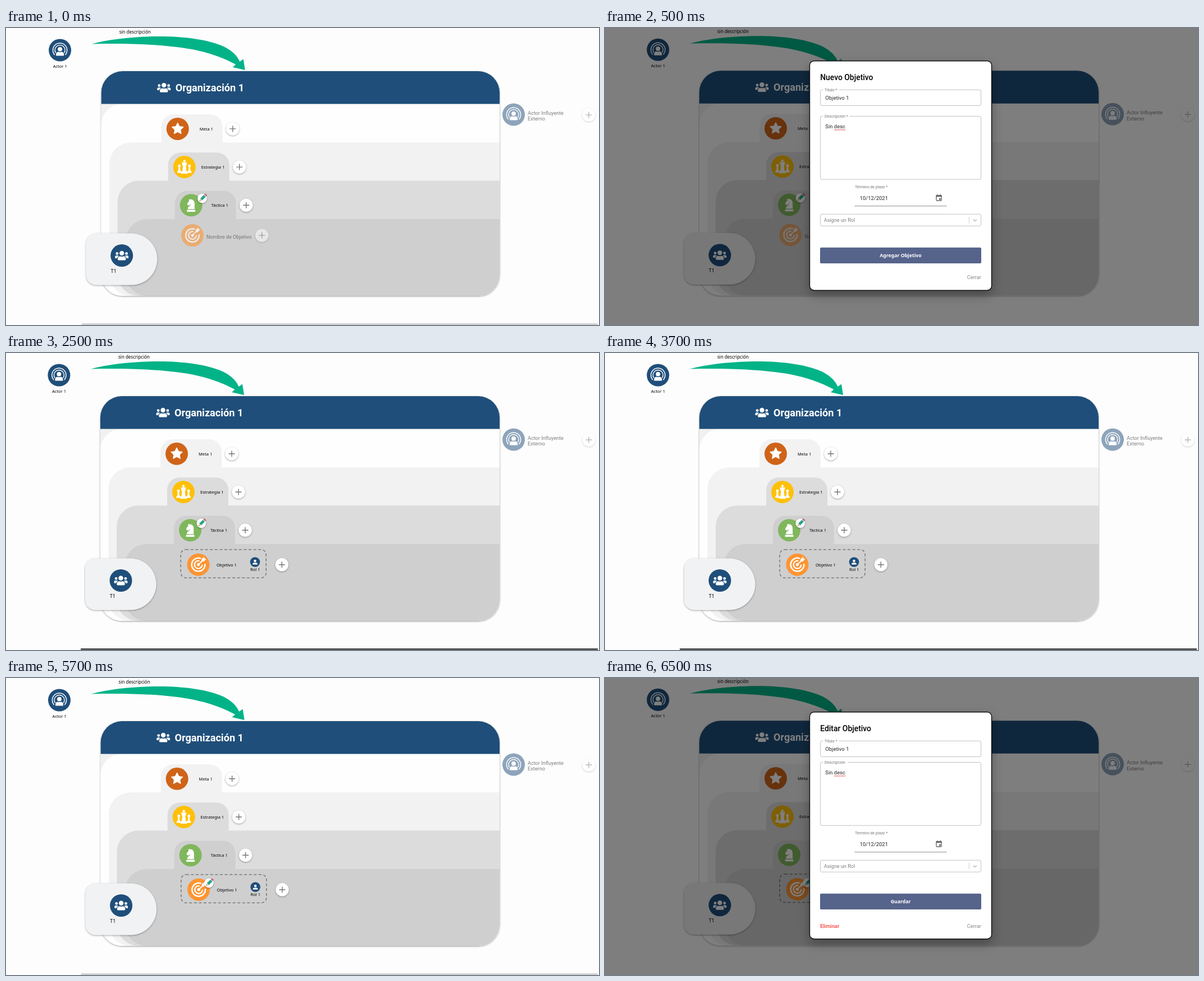
An HTML page that plays this animation: 1056x530 px, repeating every 8000 ms.

```html
<!DOCTYPE html>
<html lang="es">
<head>
<meta charset="utf-8">
<style>
html, body { margin: 0; width: 100%; height: 100%; overflow: hidden; background: #fdfdfd; }
svg { display: block; width: 1056px; height: 530px; }
text { font-family: Roboto, sans-serif; }
.small { font: 7.5px "Noto Sans", sans-serif; }
.button { font: bold 8.7px "Noto Sans", sans-serif; fill: #fff; }
.field { font-size: 9.3px; letter-spacing: .08px; fill: #222; }
.label { font-size: 7px; fill: #757575; }
.box { fill: #fff; stroke: #c2c2c2; }
</style>
</head>
<body>
<svg viewBox="0 0 1056 530">
  <defs>
    <filter id="soft" x="-30%" y="-30%" width="160%" height="160%">
      <feDropShadow dx="0" dy="1" stdDeviation="1.5" flood-opacity=".4"/>
    </filter>
    <filter id="deep" x="-30%" y="-30%" width="160%" height="160%">
      <feDropShadow dx="0" dy="8" stdDeviation="10" flood-opacity=".3"/>
    </filter>
  </defs>
  <g id="stage"></g>
</svg>
<script>
const BLUE = '#1f4e7a';
const LOOP = 8000;
const STATES = [
  { at: 0, dx: 1.7, dy: 0.1, bar: '#d0d0d0', pencil: [347.7, 304] },
  { at: 500, dx: 0, dy: -0.7, pencil: [347.7, 304], dialog: 'new' },
  { at: 2500, dx: 0, dy: 0, bar: '#555', pencil: [347.7, 304], saved: true },
  { at: 4500, dx: 0.6, dy: 0, bar: '#d0d0d0', pencil: [360.7, 366], saved: true },
  { at: 6500, dx: 0, dy: -0.7, pencil: [360.7, 366], saved: true, dialog: 'edit' }
];

const group = (x, y, body, extra = '') => `<g transform="translate(${x} ${y})" ${extra}>${body}</g>`;
const text = (x, y, str, attrs = 'class="small"') => `<text x="${x}" y="${y}" ${attrs}>${str}</text>`;
const rect = (x, y, w, h, attrs) => `<rect x="${x}" y="${y}" width="${w}" height="${h}" ${attrs}/>`;
const line = (d, color, width = 1) => `<path d="${d}" fill="none" stroke="${color}" stroke-width="${width}"/>`;
const disc = (r, fill, attrs = '') => `<circle r="${r}" fill="${fill}" ${attrs}/>`;
const badge = (x, y, fill, icon, extra) => group(x, y, disc(20, fill) + icon, extra);
const plus = (x, y, extra) => group(x, y,
  disc(11.6, '#fff', 'filter="url(#soft)"') + line('M-5.5 0H5.5M0 -5.5V5.5', '#757575', 1.4), extra);

// Box with separate corner radii: top left, top right, bottom right, bottom left
function shape(x, y, right, bottom, [a, b, c, d], attrs) {
  return `<path d="M${x + a} ${y}H${right - b}A${b} ${b} 0 0 1 ${right} ${y + b}V${bottom - c}` +
    `A${c} ${c} 0 0 1 ${right - c} ${bottom}H${x + d}A${d} ${d} 0 0 1 ${x} ${bottom - d}` +
    `V${y + a}A${a} ${a} 0 0 1 ${x + a} ${y}Z" ${attrs}/>`;
}

function arc(r, from, to) {
  const at = deg => `${r * Math.cos(deg * Math.PI / 180)} ${r * Math.sin(deg * Math.PI / 180)}`;
  return `M${at(from)}A${r} ${r} 0 ${to - from > 180 ? 1 : 0} 1 ${at(to)}`;
}

const starPoints = Array.from({ length: 10 }, (_, i) => {
  const r = i % 2 ? 5.2 : 10.4, a = i * Math.PI / 5;
  return `${r * Math.sin(a)},${-r * Math.cos(a)}`;
}).join(' ');

const PAWN = `<path d="M-1.2 -3.4H1.2L1.8 3.5 3.8 6V8H-3.8V6L-1.8 3.5Z"/><circle cy="-4.6" r="2.5"/>`;
const ICONS = {
  star: `<polygon points="${starPoints}" fill="#fff" stroke="#fff" stroke-width="1.4" stroke-linejoin="round"/>`,
  team: `<g fill="#fff"><circle cy="-4.2" r="4.2"/><circle cx="-8.4" cy="-3.6" r="2.4"/><circle cx="8.4" cy="-3.6" r="2.4"/>
    <path d="M-3 1.2Q0 2.4 3 1.2Q7.2 1.5 7.2 5.8V7Q7.2 8.4 5.6 8.4H-5.6Q-7.2 8.4 -7.2 7V5.8Q-7.2 1.5 -3 1.2Z"/>
    <path id="side" d="M-5.5 .7Q-7.9 2 -8.4 4.8H-11Q-12 4.8 -12 3.6V2.4Q-12 0 -9.6 0H-7.2Q-6.2 0 -5.5 .7Z"/>
    <path transform="scale(-1 1)" d="M-5.5 .7Q-7.9 2 -8.4 4.8H-11Q-12 4.8 -12 3.6V2.4Q-12 0 -9.6 0H-7.2Q-6.2 0 -5.5 .7Z"/></g>`.replace(' id="side"', ''),
  actor: line(arc(12.6, 138, 402), '#fff', 1.5) + line(arc(9, 146, 394), '#fff', 1.4) +
    `<g fill="#fff"><circle cy="-1.8" r="3.9"/><path d="M-7 10V8Q-7 3.2 -2.8 3Q0 4.2 2.8 3Q7 3.2 7 8V10Z"/></g>`,
  chess: `<g fill="#fff">${group(-9, 2.5, PAWN)}${group(9, 2.5, PAWN)}
    <path d="M-1 -13H1V-11.3H2.6V-9.5H1V-8H4.8L3.2 -2H2.6L3.4 6.5 5.8 9V12H-5.8V9L-3.4 6.5 -2.6 -2H-3.2L-4.8 -8H-1V-9.5H-2.6V-11.3H-1Z"/></g>`,
  knight: `<path fill="#fff" d="M-5.8 7V5.6C-5.8 2 -.4 1.6 -.4 -2L-3.6 .8 -7 -1 -6.8 -3.4 -3.4 -8 -4 -10.6H-.5C5 -10.6 6.6 -5.5 6.2 0V7ZM-7.4 8.2H7.4V11.8H-7.4Z"/>`,
  target: line(arc(11.8, -8, 292), '#fff', 2.5) + line(arc(6.9, 0, 285), '#fff', 2.3) + disc(2.6, '#fff') +
    line('M0 0L8 -8', '#fff', 2) + `<path fill="#fff" d="M5.2 -6.4L6 -10.2 10.4 -14 11 -11 14 -10.4 10.2 -6 6.4 -5.2Z"/>`,
  user: `<g fill="#fff"><circle cy="-2" r="2.3"/><path d="M-4.3 4.4V3Q-4 .9 0 .9T4.3 3V4.4Z"/></g>`
};

const pencil = (x, y) => group(x, y, disc(8.2, '#fff', 'filter="url(#soft)"') +
  `<g transform="rotate(45)">${rect(-2.4, -6.5, 4.8, 9, 'fill="#22a58a"')}${rect(-2.4, -10.2, 4.8, 2.6, 'rx="1" fill="#d9535b"')}
   ${rect(-2.4, -7.8, 4.8, 1.5, 'fill="#c9d0d3"')}<path d="M-2.4 2.5H2.4L0 6.8Z" fill="#e8c9a0"/><path d="M-.9 5.2H.9L0 6.8Z" fill="#444"/></g>`);

function panel(left) {
  const edge = 879, bottom = 478, r = 38;
  const layer = (dx, y, fill) => shape(left + dx, y, edge, bottom, [r, 0, r, r], `fill="${fill}"`);
  return shape(left, 77, edge, bottom, [r, r, r, r], 'fill="#f1f1f1" filter="url(#soft)"') +
    layer(0, 135, '#fefefe') + layer(14.5, 204.3, '#f2f2f2') +
    layer(29, 272.3, '#dcdcdc') + layer(43.5, 341, '#cfcfcf') +
    shape(left, 77, edge, 135.5, [r, r, 0, 0], `fill="${BLUE}"`);
}

function row(i, fill, tabFill, icon, name) {
  const x = 275 + 12 * i, y = 154 + 68.2 * i;
  return shape(x, y, x + 109, y + 51, [22, 22, 0, 0], `fill="${tabFill}"`) +
    badge(x + 29, y + 25.8, fill, icon) +
    text([343, 346, 364][i], y + 28.5, name) + plus(x + 127, y + 25.8);
}

function goal(saved) {
  if (!saved) return badge(330.3, 370, '#fd9533', ICONS.target, 'opacity=".6"') +
    text(355.2, 375.5, 'Nombre de Objetivo', 'font-size="9.15" fill="#757575"') + plus(454, 370, 'opacity=".5"');
  return rect(311.2, 350.7, 152, 50.5, 'rx="9" fill="none" stroke="#7b7b7b" stroke-width="1.6" stroke-dasharray="5 3.6"') +
    badge(342.5, 377.7, '#fd9533', ICONS.target) + text(375, 380.5, 'Objetivo 1') +
    group(443.5, 373, disc(8.8, BLUE) + ICONS.user) + text(435, 389, 'Rol 1') + plus(491.3, 377.7);
}

function scene({ dx, dy, saved, pencil: at, bar }) {
  const main = badge(94.4, 39.5, BLUE, ICONS.actor) + text(82, 71, 'Actor 1') +
    text(200, 9.6, 'sin descripción', 'class="small" style="font-size:8px"') +
    `<path fill="#03b388" d="M151 28.4C185 19 235 14.3 280 15C325 16 358 22 380 30.5C400 38.5 410 49 414.5 60L421 55.5 424 75 402 70 407.5 65C385 53 360 44 330 38C280 29 220 27 151 28.4Z"/>` +
    group(279.5, 106.2, ICONS.team) +
    text(300, 112.6, 'Organización 1', 'font-size="18.1" font-weight="700" fill="#fff"') +
    row(0, '#cf6418', '#f2f2f2', ICONS.star, 'Meta 1') +
    row(1, '#ffc007', '#dcdcdc', ICONS.chess, 'Estrategia 1') +
    row(2, '#80b75c', '#cfcfcf', ICONS.knight, 'Táctica 1') +
    goal(saved) + pencil(...at) +
    shape(141, 366.5, 267.5, 458.5, [18, 46, 46, 18], 'fill="#f1f2f3" filter="url(#soft)"') +
    badge(204.5, 406, BLUE, ICONS.team) + text(184.7, 437, 'T1', 'class="small" style="font-size:9px"');
  const outside = badge(904, 154.5, BLUE, ICONS.actor) +
    text(929, 154.8, 'Actor Influyente', 'font-size="9.15"') + text(929, 165.4, 'Externo', 'font-size="9.15"') + plus(1037.8, 155);
  return rect(0, 0, 1056, 530, 'fill="#fdfdfd"') + group(0, dy, panel(168 + dx)) + group(dx, dy, main) +
    group(0, dy, outside, 'opacity=".5"') +
    (bar ? rect(133 + dx, 527, 921 - dx, 3, `rx="1" fill="${bar}"`) : '');
}

const outlined = (y, h, label, gap) => rect(383.5, y, 286, h, 'rx="2.5" class="box"') +
  rect(388, y - 1, gap, 2, 'fill="#fff"') + text(391, y + 2.4, label, 'class="label"');

function dialog(kind) {
  const edit = kind === 'edit';
  const top = edit ? 60.7 : 58.7, height = edit ? 405 : 409.5;
  const shift = edit ? -7 : 0, head = edit ? 2 : 0;
  const area = edit ? 150.5 : 157.5, close = edit ? 445.6 : 448;
  const squiggle = `M408 ${area + 23.6}` + 'l1.25 1.4l1.25 -1.4'.repeat(8);
  const form = text(445, 286.4, 'Término de plazo *', 'class="label"') +
    text(453.7, 307.2, '10/12/2021', 'class="field"') + line('M444.5 317.7H608.5', '#8c8c8c') +
    rect(590, 298.8, 9.2, 9.2, 'rx="1" fill="none" stroke="#666" stroke-width="1.3"') +
    rect(589.6, 298.2, 10, 3, 'fill="#666"') + line('M592 296.8V299M597.2 296.8V299', '#666', 1.3) +
    rect(595, 303.7, 2.9, 2.9, 'fill="#666"') +
    rect(383.5, 332.2, 286, 21, 'rx="2.5" class="box"') +
    text(389.7, 346.3, 'Asigne un Rol', 'font-size="9.15" fill="#808080"') +
    line('M648.3 337V348.5', '#ccc') + line('M655.8 341.5L658.8 344.5 661.8 341.5', '#bbb', 1.5) +
    rect(383, 391.7, 287, 28.3, 'rx="2" fill="#56638b"') +
    text(526.5, 409.3, edit ? 'Guardar' : 'Agregar Objetivo', 'class="button" text-anchor="middle"');
  return rect(0, 0, 1056, 530, 'fill="#000" opacity=".5"') +
    rect(364.5, top, 324, height, 'rx="8" fill="#fff" stroke="#111" stroke-width="1.4" filter="url(#deep)"') +
    text(383.2, 93.2 + head, edit ? 'Editar Objetivo' : 'Nuevo Objetivo', 'font-size="13.9" font-weight="500"') +
    outlined(110.3 + head, 28.2, 'Título *', 29) + text(392.3, 128.3 + head, 'Objetivo 1', 'class="field"') +
    outlined(area, 112.7, edit ? 'Descripción' : 'Descripción *', edit ? 44 : 48) +
    text(392.3, area + 21.6, 'Sin desc', 'class="field"') + line(squiggle, '#e33', 0.9) +
    group(0, shift, form) +
    (edit ? text(383.2, close, 'Eliminar', 'font-size="9.3" font-weight="500" fill="#f4403a"') : '') +
    text(670, close, 'Cerrar', 'font-size="9.3" fill="#858585" text-anchor="end"');
}

const stage = document.getElementById('stage');
const start = performance.now();
let shown = null;

function update(now) {
  const t = Math.max(0, now - start) % LOOP;
  const state = STATES.findLast(s => s.at <= t);
  if (state !== shown) {
    shown = state;
    stage.innerHTML = scene(state) + (state.dialog ? dialog(state.dialog) : '');
  }
  requestAnimationFrame(update);
}
update(start);
</script>
</body>
</html>
```
